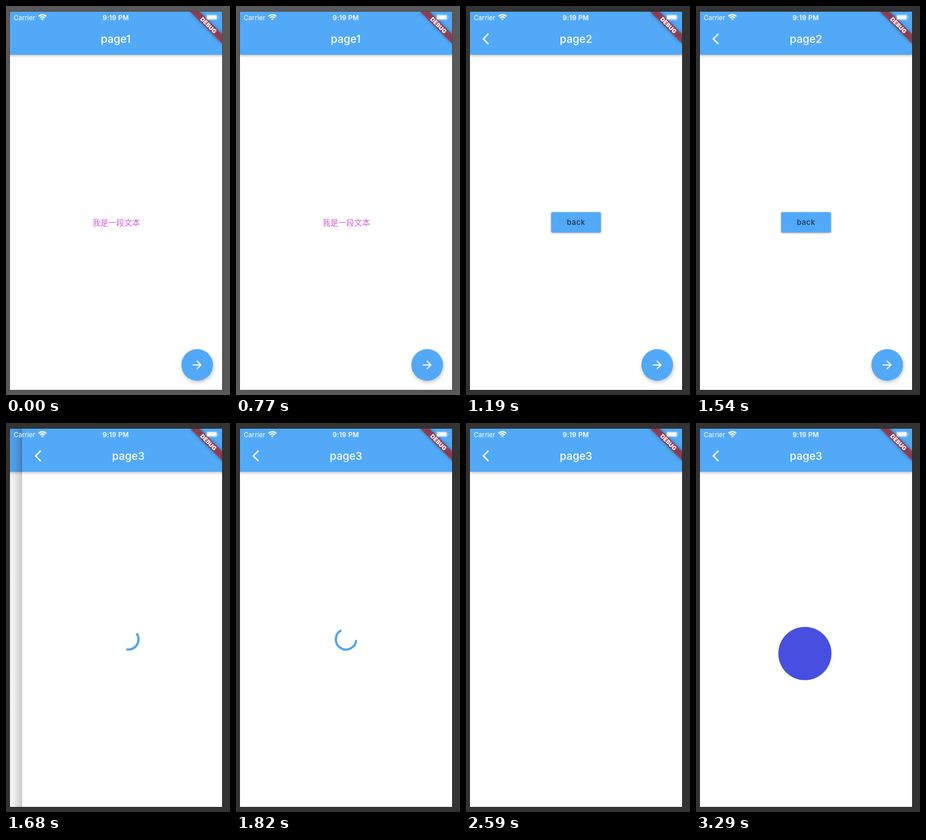
An HTML page for the animation above (3.43 s loop, 396 by 686 pixels).

```html
<!DOCTYPE html>
<html lang="zh">
<head>
<meta charset="utf-8">
<style>
  html, body { margin: 0; height: 100%; overflow: hidden; }
  body { background: #595959; }
  svg { display: block; }
  text { font-family: Inter, "Open Sans", sans-serif; fill: #fff; }
  .mid { text-anchor: middle; }
  .title { font-size: 19px; font-weight: 500; }
  .blue { fill: #52a9f7; }
  .bar { filter: drop-shadow(0 2px 2px rgba(0, 0, 0, .26)); }
  .label { font: 14px "Noto Sans CJK SC", "Noto Sans CJK", sans-serif; fill: #d65bd2; }
  .button { filter: drop-shadow(0 1px 1.5px rgba(0, 0, 0, .35)); }
  .button text { font-size: 13px; font-weight: 500; letter-spacing: .6px; fill: #1d3144; }
  .status { font-size: 11.7px; }
  .clock { font-weight: 600; letter-spacing: .25px; }
  .ribbon { fill: #b71c1c; fill-opacity: .63; filter: drop-shadow(0 0 3px rgba(0, 0, 0, .5)); }
  .debug { font-size: 10.2px; font-weight: 900; }
</style>
</head>
<body>
<svg id="stage" width="396" height="686" viewBox="0 0 396 686">
  <defs>
    <linearGradient id="edge">
      <stop offset="0" stop-opacity="0"/>
      <stop offset=".3" stop-opacity=".016"/>
      <stop offset=".6" stop-opacity=".07"/>
      <stop offset="1" stop-opacity=".22"/>
    </linearGradient>
    <g id="sheet">
      <rect width="375" height="667" fill="#fff"/>
      <rect class="blue bar" width="375" height="76"/>
    </g>
    <path id="chevron" transform="translate(16 36)" fill="#fff"
      d="M17.51 3.87 15.73 2.1 5.84 12l9.9 9.9 1.77-1.77L9.38 12z"/>
    <rect id="edgeShade" x="-37.5" width="37.5" height="667" fill="url(#edge)"/>
  </defs>

  <rect x="6" y="9" width="377" height="669" fill="#000" fill-opacity=".2"/>
  <svg x="7" y="10" width="375" height="667">
    <g id="page1">
      <use href="#sheet"/>
      <text class="title mid" x="187" y="55">page1</text>
      <text class="label mid" x="188" y="377">我是一段文本</text>
    </g>

    <g id="page2">
      <use class="shade" href="#edgeShade"/>
      <use href="#sheet"/>
      <use href="#chevron"/>
      <text class="title mid" x="187.5" y="55">page2</text>
      <g class="button">
        <rect class="blue" x="143.5" y="353.5" width="88" height="36" rx="2"/>
        <text class="mid" x="187.5" y="376">back</text>
      </g>
    </g>

    <g id="fab">
      <circle class="blue" cx="331" cy="623" r="28"/>
      <path transform="translate(319 611)" fill="#fff"
        d="M12 4l-1.41 1.41L16.17 11H4v2h12.17l-5.58 5.59L12 20l8-8z"/>
    </g>

    <g id="page3">
      <use class="shade" href="#edgeShade"/>
      <use href="#sheet"/>
      <use href="#chevron"/>
      <text class="title mid" x="187.5" y="55">page3</text>
      <path id="spinner" fill="none" stroke="#52a5e4" stroke-width="4"/>
      <circle id="picture" cx="185.5" cy="396.5" r="47" fill="#484fe0"/>
    </g>

    <g transform="rotate(45) translate(0 0)" id="banner">
      <rect class="ribbon" x="-40" y="28" width="80" height="12"/>
      <text class="debug mid" x="0" y="37.7">DEBUG</text>
    </g>

    <text class="status" x="6.5" y="14.5">Carrier</text>
    <g fill="none" stroke="#fff" stroke-width="2.2">
      <path d="M50.6 8.2a9.6 9.6 0 0 1 13.6 0M53 10.9a6.2 6.2 0 0 1 8.8 0"/>
      <path d="M57.4 15.6l-2.4-2.5a3.4 3.4 0 0 1 4.8 0z" fill="#fff" stroke="none"/>
    </g>
    <text class="status clock mid" x="187" y="14.5">9:19 PM</text>
    <rect x="346.8" y="4.8" width="20" height="10" rx="2.4" fill="none" stroke="#fff" stroke-opacity=".4"/>
    <rect x="348.2" y="6.2" width="17.2" height="7.2" rx="1.2" fill="#fff"/>
    <path d="M368 8v3.6q2-1.8 0-3.6" fill="#fff" fill-opacity=".5"/>
  </svg>
</svg>

<script>
const LOOP = 3430, STEP = 70, WIDTH = 375;
const PUSH_MS = 250, PUSH_2 = 935, PUSH_3 = 1542;
const SPIN_START = 1487, SPIN_MS = 1089, LOADED = 2800;
const el = id => document.getElementById(id);
const clamp = v => Math.min(1, Math.max(0, v));

function cubic(x1, y1, x2, y2) {
  const at = (a, b, s) => 3 * (1 - s) ** 2 * s * a + 3 * (1 - s) * s * s * b + s ** 3;
  return x => {
    if (x <= 0 || x >= 1) return clamp(x);
    let lo = 0, hi = 1;
    for (let i = 0; i < 24; i++) {
      const mid = (lo + hi) / 2;
      if (at(x1, x2, mid) < x) lo = mid; else hi = mid;
    }
    return at(y1, y2, lo);
  };
}
const slideEase = cubic(.35, .91, .33, .97);
const spinEase = cubic(.4, 0, .2, 1);

const shift = (id, x) => el(id).setAttribute("transform", `translate(${x} 0)`);
const show = (id, on) => el(id).style.display = on ? "" : "none";

function push(id, progress) {
  shift(id, WIDTH * (1 - progress));
  show(id, progress > 0);
  el(id).querySelector(".shade").style.opacity = progress;
}

function arc(cx, cy, r, start, sweep) {
  const point = deg => {
    const a = deg * Math.PI / 180;
    return `${cx + r * Math.cos(a)} ${cy + r * Math.sin(a)}`;
  };
  return `M${point(start)}A${r} ${r} 0 ${sweep > 180 ? 1 : 0} 1 ${point(start + sweep)}`;
}

function drawSpinner(time) {
  const turns = Math.max(0, time - SPIN_START) / SPIN_MS;
  const phase = turns % 1;
  const head = spinEase(clamp(phase * 2));
  const tail = spinEase(clamp(phase * 2 - 1));
  const start = -90 + 270 * tail + 216 * turns + 90 * phase;
  el("spinner").setAttribute("d", arc(187.5, 371.5, 18, start, Math.max(.1, 270 * (head - tail))));
}

function render(time) {
  const second = slideEase((time - PUSH_2) / PUSH_MS);
  const third = slideEase((time - PUSH_3) / PUSH_MS);
  document.body.style.background = time < 840 ? "#595959" : "#333";

  shift("page1", -WIDTH / 3 * second);
  push("page2", second);
  if (third > 0) shift("page2", -WIDTH / 3 * third);
  shift("fab", -WIDTH / 3 * third);
  push("page3", third);

  // The round button lifts while it is pressed.
  const lift = time >= 910 && time < 1190 ? 1 : 0;
  el("fab").style.filter =
    `drop-shadow(${1 + lift}px ${3 + 2 * lift}px ${3 + lift}px rgba(0,0,0,${.22 + .06 * lift}))`;

  drawSpinner(time);
  show("spinner", time < LOADED);
  show("picture", time >= LOADED);
}

const origin = performance.now();
function tick() {
  const time = (performance.now() - origin) % LOOP;
  render(Math.floor(time / STEP) * STEP);
  requestAnimationFrame(tick);
}
// The ribbon hangs from the top right corner.
el("banner").setAttribute("transform", `translate(${WIDTH} 0) rotate(45)`);
tick();
</script>
</body>
</html>
```
